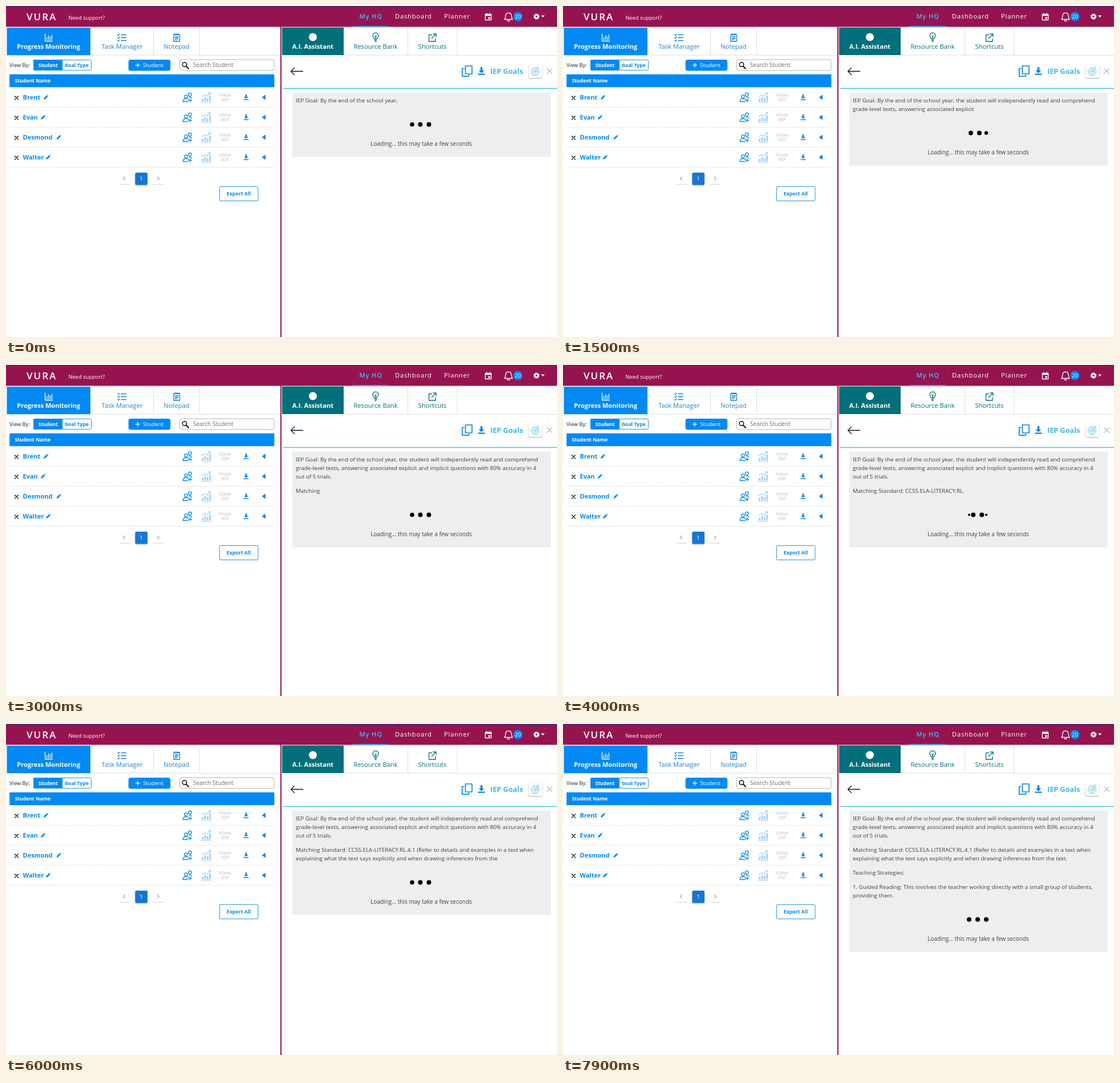
Write an HTML page that moves like this. It is 966 px wide and 580 px high and loops after 8 s.

```html
<!DOCTYPE html>
<html lang="en">
<head>
<meta charset="utf-8">
<title>Student goals</title>
<style>
html, body { margin: 0; width: 100%; height: 100%; overflow: hidden; background: #fff; }
svg { display: block; font-family: "Open Sans", sans-serif; }
.mid { text-anchor: middle; }
.bold { font-weight: 700; }
.blue { fill: #0389f4; }
.teal { fill: #036f7b; }
.white { fill: #fff; }
.line { fill: none; stroke: currentColor; stroke-width: 1.3; stroke-linecap: round; stroke-linejoin: round; }
.thin { stroke-width: 1; }
.nav { font-size: 11px; letter-spacing: .9px; }
.tab { font-size: 11.2px; text-anchor: middle; }
.name { font-size: 11px; }
.body { font-size: 9.83px; fill: #3c4148; }
.raised { filter: drop-shadow(0 1.5px 1.2px #0005); }
</style>
</head>
<body>
<svg width="966" height="580" viewBox="0 0 966 580">
  <defs>
    <g id="download">
      <path fill="currentColor" d="M-1.3-5h2.6v4h2.4L0 2.8-3.7-1h2.4zM-4.5 3.4h9v1.6h-9z"/>
    </g>
    <g id="cross"><path class="line" d="M-3-3 3 3M3-3-3 3"/></g>
    <g id="pencil"><path fill="currentColor" d="M-4 4-3.3 1.2 1.3-3.4 3.4-1.3-1.2 3.3zM2-4l.7-.5 1.8 1.8-.5.7z"/></g>
    <g id="people" class="line">
      <circle cx="-2.5" cy="-1.5" r="2.7"/>
      <path d="M-7.8 7.5C-7.8 1 2 1 2.4 5M-7.8 7.5H1.5"/>
      <circle cx="4.3" cy="-4.8" r="2.8"/>
      <path d="M3.5-.2c2.3-.6 4 .4 4.2 2.4M5 3v5M2.5 5.5h5"/>
    </g>
    <g id="growth">
      <path fill="currentColor" d="M-8 3h3v4h-3zM-3.6 0h3v7h-3zM.8 1.5h3V7h-3zM5.2-3h3V7h-3zM-9 8H9v1.2H-9z"/>
      <path class="line" d="M-8-1-3-4.5 1.5-2 7-8M4-8h3.5v3"/>
    </g>
  </defs>

  <!-- top bar -->
  <path fill="#95144f" d="M0 0h966v36.5H0zM481 36h2v544h-2z"/>
  <path fill="#23306e" d="M0 0h966v1H0z"/>
  <g class="white">
    <text x="36" y="25" font-size="17" font-weight="600" letter-spacing="2">VURA</text>
    <text x="109.5" y="24" font-size="9.3">Need support?</text>
    <g class="nav">
      <text x="619.5" y="22.3" fill="#45b8ff" font-weight="600">My HQ</text>
      <text x="682" y="22.3">Dashboard</text>
      <text x="768" y="22.3">Planner</text>
    </g>
  </g>
  <path fill="#2aa5f6" d="M608 35h63v1.5h-63z"/>
  <g color="#fff">
    <path class="line" d="M840.3 14.5h10.4v10h-10.4zM842.8 12.7v2M848.2 12.7v2"/>
    <path class="white" d="M840 14h11v3.3h-11zM845.5 19.5h3.2v3.2h-3.2z"/>
    <path class="line" d="M874 23.5c2-1.5 1.5-4 1.8-6.5 .8-6.5 9.6-6.5 10.4 0 .3 2.5-.2 5 1.8 6.5zM879 25.5c1 1.4 3 1.4 4 0"/>
    <circle cx="930" cy="18.5" r="3" fill="none" stroke="#fff" stroke-width="2.6"/>
    <circle cx="930" cy="18.5" r="4.7" fill="none" stroke="#fff" stroke-width="1.6" stroke-dasharray="1.85"/>
    <path class="white" d="M938 16.5h6.4l-3.2 3.6z"/>
  </g>
  <circle class="blue" cx="897.5" cy="18.5" r="8"/>
  <text class="mid white" x="897.5" y="22" font-size="9.5">20</text>

  <!-- tabs -->
  <path class="line thin" color="#dedede" d="M148 38.5h191.5v47.5H148M258.5 38.5V86M340 86.5h141M592 37.5h199V86H592M704.5 38v48M791 86.5h175"/>
  <path class="blue" d="M1.5 38H148v48.3H1.5z"/>
  <path class="teal" d="M484 37.5h108V86H484z"/>
  <path class="line" color="#fff" d="M68.5 49v12.5h13M71.5 59v-3.5M74.5 59v-7M77.5 59v-5M80.5 59v-8"/>
  <path class="line" color="#0d7fe0" d="M202 50.5h8.5M202 55.5h8.5M202 60.5h8.5M196 50.5l1.2 1.2 2-2.4M196 55.5l1.2 1.2 2-2.4M196 60.5l1.2 1.2 2-2.4"/>
  <path class="line" color="#0d7fe0" d="M294 50h10.5v12H294zM296.5 48.5v2.5M299.2 48.5v2.5M302 48.5v2.5M296.5 54h5.5M296.5 56.5h5.5M296.5 59h3"/>
  <g class="tab">
    <text class="bold white" x="74.7" y="75" font-size="11">Progress Monitoring</text>
    <text x="203.5" y="75" fill="#257fc9">Task Manager</text>
    <text x="299" y="75" fill="#257fc9">Notepad</text>
    <text class="bold white" x="538" y="74.5">A.I. Assistant</text>
    <text class="teal" x="648" y="74.5">Resource Bank</text>
    <text class="teal" x="747.5" y="75">Shortcuts</text>
  </g>
  <circle class="white" cx="538" cy="54.5" r="7"/>
  <path class="line" color="#036f7b" d="M646 58c0-2-3-3-3-6 0-6.5 10-6.5 10 0 0 3-3 4-3 6zM646.3 60.5h3.4M647 62.3h2M648 58v-4l-1.5-1.5M648 54l1.5-1.5"/>
  <path class="line" color="#036f7b" d="M746.5 50.5h-5V62h11.5v-5M749 49h5v5M754 49l-7.5 7.5"/>

  <!-- student filter -->
  <text x="6" y="107" font-size="9.3" fill="#222">View By:</text>
  <rect x="48.5" y="94.5" width="101" height="18" rx="2" fill="#fff" stroke="#2f93d8"/>
  <path class="blue" d="M48.5 94.3H99v18.4H48.5z"/>
  <g class="bold mid" font-size="8.65">
    <text class="white" x="73.7" y="106.7">Student</text>
    <text class="blue" x="123.8" y="106.7">Goal Type</text>
  </g>
  <rect class="blue" x="214.7" y="94" width="73.6" height="19.5" rx="4"/>
  <path class="line" color="#fff" d="M227.5 103.7h7M231 100.2v7"/>
  <text class="white" x="240" y="107.3" font-size="9.85">Student</text>
  <rect x="304.5" y="94" width="165.5" height="19" rx="3" fill="#fff" stroke="#b5b5b5"/>
  <circle cx="313" cy="102.5" r="3.8" fill="none" stroke="#111" stroke-width="1.5"/>
  <path class="line" color="#111" style="stroke-width: 2" d="M316.3 106l3.7 3.7"/>
  <text x="328" y="107.3" font-size="10" fill="#6b6f75">Search Student</text>
  <path class="blue" d="M6.2 119.7h464.2v22.6H6.2z"/>
  <text class="bold white" x="15.5" y="134" font-size="8.7">Student Name</text>

  <g id="students"></g>

  <!-- paging -->
  <path class="line" color="#ddd" d="M198.5 312.5h18M257.5 312.5h18"/>
  <path class="line" color="#aaa" d="M208.5 299.5l-3 2.7 3 2.7M265.5 299.5l3 2.7-3 2.7"/>
  <rect class="raised" x="226.5" y="292" width="21.5" height="21.5" rx="2" fill="#1976d2"/>
  <text class="mid white" x="237" y="306.2" font-size="9.8">1</text>
  <rect x="374.5" y="316.5" width="67.5" height="25" rx="1.5" fill="#fff" stroke="#2f93d8"/>
  <text class="bold mid blue" x="408" y="332" font-size="8.8">Export All</text>

  <!-- goal toolbar -->
  <path class="line" color="#111" d="M499.5 114.5h21M505.5 108.5l-6 6 6 6"/>
  <path class="line" color="#0b85e0" style="stroke-width: 1.7" d="M805.5 105H817v14h-11.5zM803 109.5h-3.2v13.7h11.5V121"/>
  <use href="#download" transform="translate(833.5 114) scale(1.35)" color="#0b85e0"/>
  <text class="bold" x="849" y="118.7" font-size="12.7" fill="#3fb9ec">IEP Goals</text>
  <rect class="raised" x="916.5" y="103" width="23.5" height="23" rx="2" fill="#fff"/>
  <g color="#5cc8dc">
    <circle class="line thin" cx="927.5" cy="115" r="7"/>
    <circle class="line thin" cx="927.5" cy="115" r="4.3"/>
    <circle class="line thin" cx="927.5" cy="115" r="1.6"/>
    <path class="line thin" d="M927.5 115l6.5-6.5M932 110v-2.5l2-2"/>
  </g>
  <path class="line thin" color="#8b8b8b" d="M948.7 110l8.6 8.6M957.3 110l-8.6 8.6"/>
  <path fill="#45c1e4" d="M486 143.8h480v1.5H486z"/>

  <!-- streamed answer -->
  <rect id="panel" x="502" y="152" width="453" fill="#eee"/>
  <g id="answer" class="body"></g>
  <g id="loader">
    <circle cy="41.5"/><circle cy="41.5"/><circle cy="41.5"/><circle cy="41.5"/>
    <text class="mid" x="728" y="78.5" font-size="10" fill="#3c4148">Loading... this may take a few seconds</text>
  </g>
</svg>
<script>
const LOOP = 8000, STEP = 100;
const get = id => document.getElementById(id);

const students = [["Brent", 70], ["Evan", 65], ["Desmond", 92.5], ["Walter", 74]];
get("students").innerHTML = students.map(([name, penX], i) => `
  <g transform="translate(0 ${160 + 35 * i})" color="#0389f4">
    <use href="#cross" x="18.5" y="1" color="#111"/>
    <text class="bold blue name" x="29.5" y="4">${name}</text>
    <use href="#pencil" x="${penX}"/>
    <use href="#people" x="318"/>
    <use href="#growth" x="351" color="#a8d1f3"/>
    <g class="mid bold" font-size="9.2" fill="#d8d8d8">
      <text x="384" y="-1">View</text><text x="384" y="7.3">IEP</text>
    </g>
    <use href="#download" x="421"/>
    <path class="blue" d="M448.5 0l6.5-4.5v9z"/>
    <path d="M6 17.5h464.5" stroke="#d2d2d2" stroke-dasharray="1.5"/>
  </g>`).join("");

// Each part is typed word by word and is complete at its time.
const parts = [
  [0, "IEP Goal: By the end of the school year,"],
  [900, " the student will independently read and comprehend"],
  [1500, "\ngrade-level texts, answering associated explicit"],
  [2700, " and implicit questions with 80% accuracy in 4\nout of 5 trials."],
  [2900, "\n\nMatching"],
  [3600, " Standard: CCSS.ELA-"],
  [4000, "LITERACY.RL."],
  [4500, "4.1 (Refer to details and"],
  [5200, " examples in a text when\nexplaining what the text says"],
  [6300, " explicitly and when drawing inferences from the text.\n\nTeaching Strategies:"],
  [6800, "\n\n1. Guided Reading: This"],
  [7900, " involves the teacher working directly with a small group of students,\nproviding them"]
];

function typed(t) {
  let out = "", start = 0;
  for (const [end, part] of parts) {
    if (t < end) {
      const words = part.match(/\s*[^\s.-]+[.,:-]*/g);
      const count = Math.floor(words.length * (t - start) / (end - start));
      return out + words.slice(0, count).join("");
    }
    out += part;
    start = end;
  }
  return out;
}

const dots = document.querySelectorAll("#loader circle");
function moveDots(t) {
  const x = ((t + 495) % 600) / 600;
  const p = x * x * x * (x * (6 * x - 15) + 10);
  const states = [[712, p], [712 + 15 * p, 1], [727 + 15 * p, 1], [742, 1 - p]];
  states.forEach(([cx, size], i) => {
    dots[i].setAttribute("cx", cx);
    dots[i].setAttribute("r", 4 * size);
  });
}

function draw() {
  const t = Math.floor(performance.now() % LOOP / STEP) * STEP;
  let y = 151, html = "";
  for (const line of typed(t).split("\n")) {
    y += line ? 15 : 10;
    if (line) html += `<text x="508" y="${y + 3.4}">${line}</text>`;
  }
  get("answer").innerHTML = html;
  get("panel").setAttribute("height", y + 98.5 - 152);
  get("loader").setAttribute("transform", `translate(0 ${y})`);
  moveDots(t);
  requestAnimationFrame(draw);
}
draw();
</script>
</body>
</html>
```
